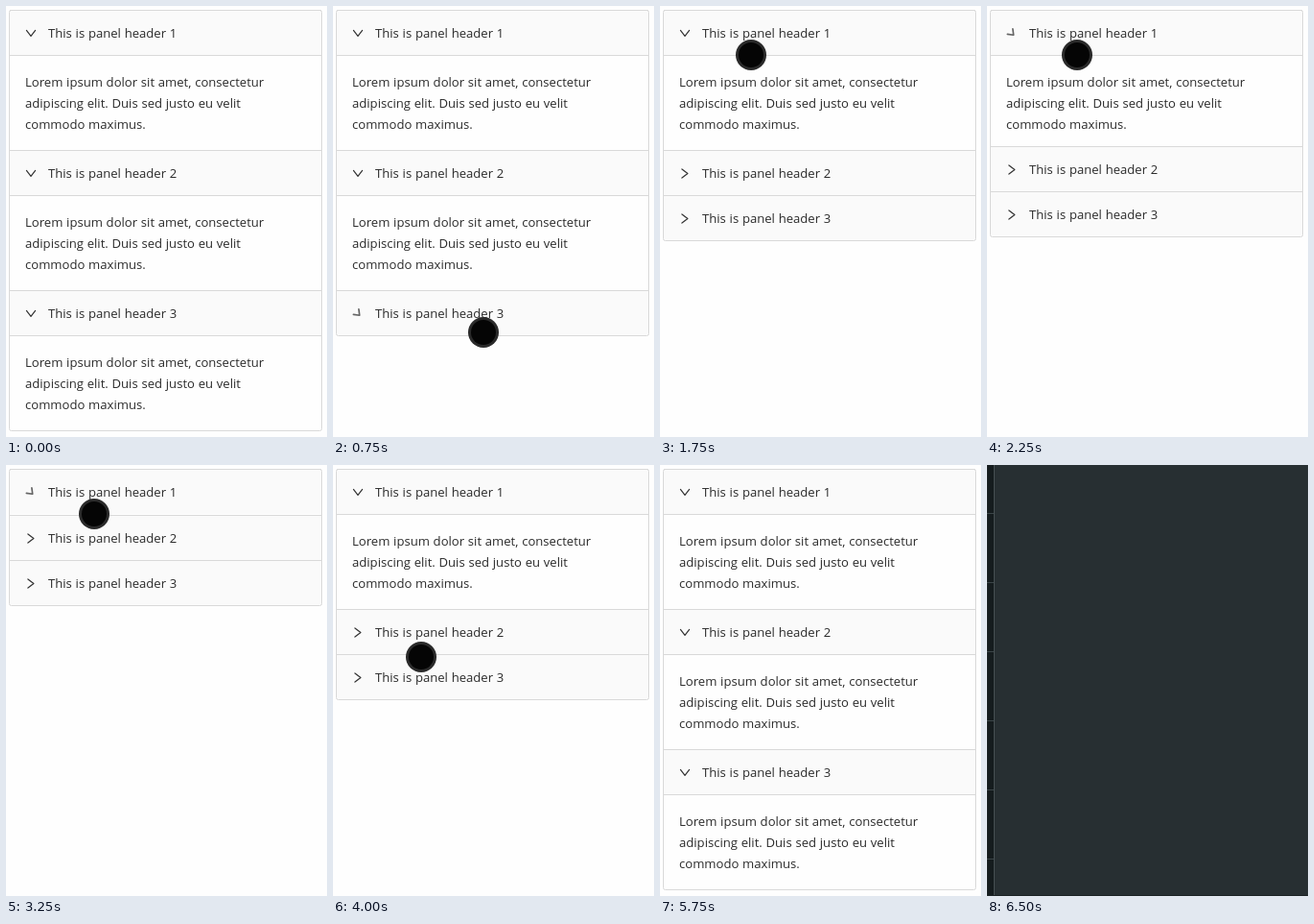
An HTML page that plays this animation: 335x449 px, repeating every 6.75 s.

```html
<!DOCTYPE html>
<html lang="en">
<head>
<meta charset="utf-8">
<title>Collapsible panels</title>
<style>
  html, body { margin: 0; width: 100%; height: 100%; overflow: hidden; background: #fefefe; }
  svg { display: block; width: 335px; height: 449px; }
  text { font: 13.1px "Open Sans", "Noto Sans", sans-serif; word-spacing: 0.35px; fill: #2b2b2b; }
  .edge { fill: #d9d9d9; }
  .head { fill: #fafafa; }
  .chevron { fill: none; stroke-linecap: round; stroke-linejoin: round; }
</style>
</head>
<body>
<svg viewBox="0 0 335 449" xmlns="http://www.w3.org/2000/svg">
  <g id="page">
    <rect width="335" height="449" fill="#fefefe"/>
    <g id="panels"></g>
    <rect id="frame" x="3.5" y="4.5" width="326" rx="2" fill="none" stroke="#d9d9d9"/>
    <g id="cursor">
      <circle r="16" fill="#2a2a2a"/>
      <circle r="13" fill="#050505"/>
    </g>
  </g>
  <g id="dark">
    <rect width="335" height="449" fill="#272f32"/>
    <rect width="7" height="449" fill="#151c1e"/>
    <rect x="7" width="1" height="449" fill="#465053"/>
    <g id="ticks" fill="#3b4548"></g>
    <rect y="448" width="335" height="1" fill="#1b2224"/>
  </g>
</svg>
<script>
const NS = "http://www.w3.org/2000/svg";
const LOOP = 6750, STEP = 250, DARK_AT = 6500;
const HEAD = 47, BODY = 99, SLIDE_MS = 200, TURN_MS = 240;
const LINES = [
  "Lorem ipsum dolor sit amet, consectetur",
  "adipiscing elit. Duis sed justo eu velit",
  "commodo maximus."
];

// When each panel is clicked shut and open again
const CLICKS = [
  { shut: 2226, open: 3238 },
  { shut: 1463, open: 4086 },
  { shut: 540, open: 4976 }
];

// Cursor paths as [time, x, y]; the cursor is hidden outside them
const TRIPS = [
  [[250, 157, 340], [750, 157, 340], [1250, 106, 195], [1500, 106, 195],
   [1750, 95, 51], [3250, 92, 51], [3750, 88, 220], [4000, 92, 200], [4250, 92, 200]],
  [[4750, 92, 340], [5000, 92, 344], [5250, 92, 340], [5500, 83, 435]]
];

const $ = id => document.getElementById(id);
const clamp = v => Math.min(1, Math.max(0, v));
const ease = p => p * p * (3 - 2 * p);
const mix = (a, b, p) => a + (b - a) * p;
const show = (el, on) => { el.style.display = on ? "" : "none"; };

function add(parent, tag, attrs, label) {
  const el = document.createElementNS(NS, tag);
  for (const key in attrs) el.setAttribute(key, attrs[key]);
  if (label) el.textContent = label;
  return parent.appendChild(el);
}

function makePanel(clicks, i) {
  const clip = add($("panels"), "clipPath", { id: "clip" + i });
  const mask = add(clip, "rect", { x: 3, y: HEAD, width: 327 });
  const group = add($("panels"), "g", {});
  add(group, "rect", { class: "head", x: 3, width: 327, height: HEAD });
  add(group, "rect", { class: "edge", x: 4, width: 325, height: 1 });
  const chevron = add(group, "path", { class: "chevron", d: "M-4.6 -3.1L0 2.9L4.6 -3.1" });
  add(group, "text", { x: 44, y: 29 }, `This is panel header ${i + 1}`);
  const body = add(group, "g", { "clip-path": `url(#clip${i})` });
  add(body, "rect", { class: "edge", x: 3, y: HEAD, width: 327, height: 1 });
  LINES.forEach((line, row) => add(body, "text", { x: 20, y: 80 + 22 * row }, line));
  return { clicks, group, mask, chevron, body };
}

const panels = CLICKS.map(makePanel);
for (let y = 50; y < 449; y += 72) add($("ticks"), "rect", { y, width: 7, height: 1 });

function drawPanel({ clicks, group, mask, chevron, body }, t, y) {
  const opening = t >= clicks.open;
  const since = t - (opening ? clicks.open : clicks.shut);
  const slide = ease(clamp(since / SLIDE_MS));
  const height = Math.round(BODY * (opening ? slide : 1 - slide));
  const turning = since > 0 && since < TURN_MS;
  const closed = since >= TURN_MS && !opening;
  const angle = turning ? -45 : closed ? -90 : 0;

  group.setAttribute("transform", `translate(0 ${y})`);
  mask.setAttribute("height", height);
  show(body, height > 4);
  chevron.setAttribute("transform",
    `translate(26 24.5) rotate(${angle}) scale(${turning ? 0.85 : 1})`);
  chevron.setAttribute("stroke", turning ? "#666" : "#333");
  chevron.setAttribute("stroke-width", turning ? 2 : 1.2);
  return y + HEAD + height;
}

function cursorAt(t) {
  const trip = TRIPS.find(keys => t >= keys[0][0] && t < keys.at(-1)[0] + STEP);
  if (!trip) return null;
  const next = trip.findIndex(key => key[0] > t);
  if (next < 0) return trip.at(-1).slice(1);
  const [t0, x0, y0] = trip[next - 1], [t1, x1, y1] = trip[next];
  const p = (t - t0) / (t1 - t0);
  return [mix(x0, x1, p), mix(y0, y1, p)];
}

function draw(time) {
  const t = Math.floor((time % LOOP) / STEP) * STEP;
  show($("dark"), t >= DARK_AT);
  show($("page"), t < DARK_AT);

  const bottom = panels.reduce((y, panel) => drawPanel(panel, t, y), 4);
  $("frame").setAttribute("height", bottom - 4);

  const at = cursorAt(t);
  show($("cursor"), at);
  if (at) $("cursor").setAttribute("transform", `translate(${at})`);
}

const start = performance.now();
function tick() {
  draw(performance.now() - start);
  requestAnimationFrame(tick);
}
tick();
</script>
</body>
</html>
```
